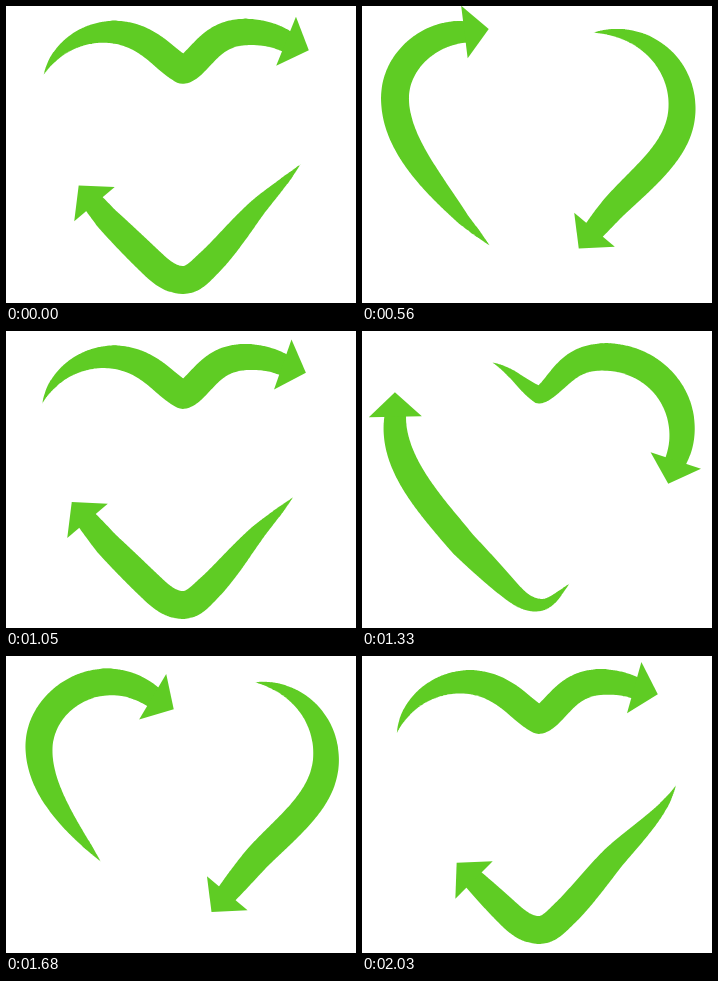
Recreate the animation shown at these times as an HTML page with a canvas. Size 350 by 297 pixels, loop 2.1 s.

```html
<!DOCTYPE html>
<html lang="en">
<head>
<meta charset="utf-8">
<title>Heart arrows</title>
<style>
  html, body { margin: 0; width: 100%; height: 100%; overflow: hidden; background: #fff; }
  canvas { display: block; }
</style>
</head>
<body>
<canvas width="350" height="297"></canvas>
<script>
const ctx = document.querySelector('canvas').getContext('2d');
const STEP = 70, STEPS = 30;
const BODY = 286, HEAD = 24.5, WING = 26.5;

// Centre line of the heart, clockwise from the upper notch
const heart = document.createElementNS('http://www.w3.org/2000/svg', 'path');
heart.setAttribute('d', `M177 64 C184 62 190 54 197 47 C210 33 222 26 242 26
  C285 26 320 58 320 101 C320 142 284 168 252 201 C234 221 217 244 202 258
  C192 268 186 274 177 274 C168 274 160 270 150 261 C134 246 118 230 101 213
  C71 177 33 137 33 92 C33 56 66 26 103 26 C125 26 141 35 157 49
  C164 55 170 60 177 64`);
const total = heart.getTotalLength();
const pointAt = s => heart.getPointAtLength((s % total + total) % total);

// Body width: pointed tail, widest past the middle, narrower at the head
const widthAt = u => u < 0.6
  ? 28 * (1 - (1 - u / 0.6) ** 2.3)
  : 28 - 6.5 * ((u - 0.6) / 0.4) ** 3;

// The two arrows run at slightly different speeds (px per step)
const arrows = [
  { start: 117.5, speed: 29.42 },
  { start: 548, speed: 28.51 }
];

function drawArrow(s) {
  ctx.beginPath();
  for (let d = 0; d <= BODY; d++) {
    const p = pointAt(s - BODY + d), r = widthAt(d / BODY) / 2;
    ctx.moveTo(p.x + r, p.y);
    ctx.arc(p.x, p.y, r, 0, 7);
  }
  ctx.fill();

  const base = pointAt(s), back = pointAt(s - 16);
  ctx.save();
  ctx.translate(base.x, base.y);
  ctx.rotate(Math.atan2(base.y - back.y, base.x - back.x));
  ctx.beginPath();
  ctx.moveTo(HEAD, 0);
  ctx.lineTo(0, WING);
  ctx.lineTo(0, -WING);
  ctx.fill();
  ctx.restore();
}

let shown = -1;
const begin = performance.now();

function tick() {
  const step = Math.floor(Math.max(0, performance.now() - begin) / STEP) % STEPS;
  if (step !== shown) {
    shown = step;
    ctx.fillStyle = '#fff';
    ctx.fillRect(0, 0, 350, 297);
    ctx.fillStyle = '#5fcc24';
    for (const a of arrows) drawArrow(a.start + a.speed * step);
  }
  requestAnimationFrame(tick);
}
tick();
</script>
</body>
</html>
```
